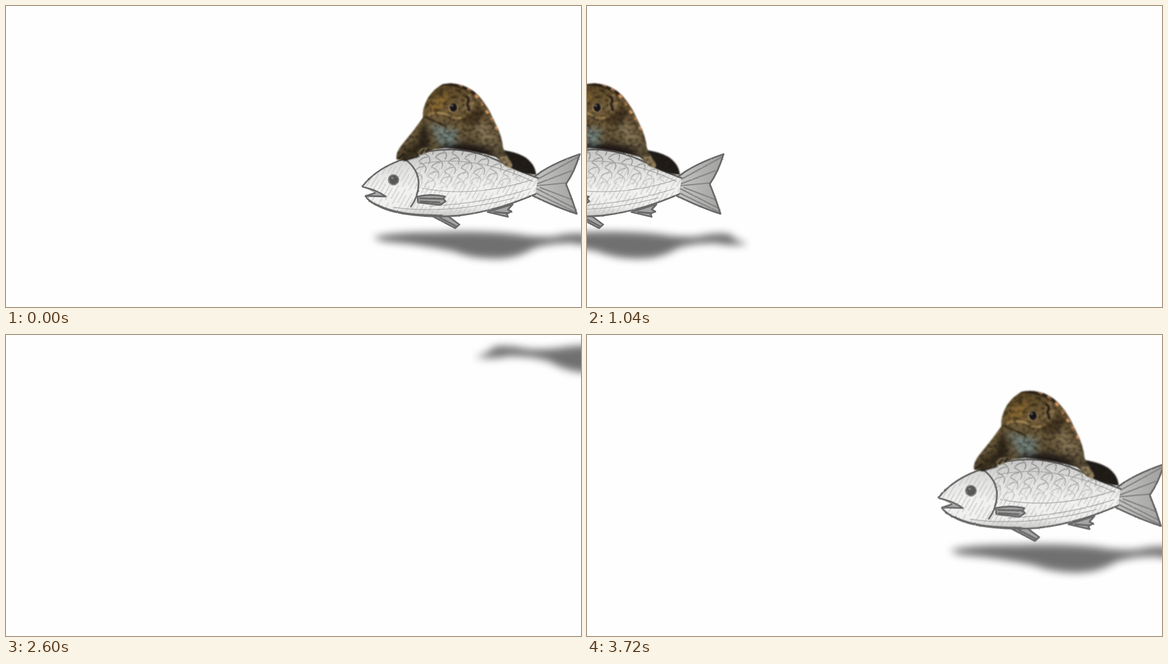
Write an HTML page without scripts that moves like this. It is 960x504 px and loops after 3.76 s.

```html
<!DOCTYPE html>
<html lang="en">
<head>
<meta charset="utf-8">
<title>Fish ride</title>
<style>
html, body { margin: 0; width: 100%; height: 100%; overflow: hidden; background: #fefefe; }
svg { display: block; width: 100vw; height: 100vh; }

.rider { transform-origin: 0 0; animation: swim 3760ms infinite; }

/* One tick is 40 ms, 94 ticks per loop */
@keyframes swim {
  0%       { transform: translate(0, 0) scale(1); animation-timing-function: steps(7, end); }
  7.4468%  { transform: translate(-170px, -16px) scale(1); animation-timing-function: steps(7, end); }
  14.8936% { transform: translate(-363px, 0) scale(1); animation-timing-function: steps(4, end); }
  19.1489% { transform: translate(-567px, 0) scale(1); animation-timing-function: steps(1, end); }
  21.2765% { transform: translate(-594px, 0) scale(1); animation-timing-function: steps(6, end); }
  27.6595% { transform: translate(-730px, 0) scale(1); animation-timing-function: steps(8, end); }
  36.1701% { transform: translate(-1008px, 0) scale(1); animation-timing-function: steps(1, end); }
  36.1702% { transform: translate(630px, -384px) scale(-1.056, 1.056); animation-timing-function: steps(8, end); }
  44.6808% { transform: translate(946px, -384px) scale(-1.056, 1.056); animation-timing-function: steps(14, end); }
  59.5744% { transform: translate(1507px, -384px) scale(-1.056, 1.056); animation-timing-function: steps(9, end); }
  69.1489% { transform: translate(1838px, -384px) scale(-1.056, 1.056); animation-timing-function: steps(4, end); }
  73.4042% { transform: translate(2022px, -384px) scale(-1.056, 1.056); animation-timing-function: steps(1, end); }
  76.5957% { transform: translate(334px, -41px) scale(1.037); animation-timing-function: steps(8, end); }
  85.1063% { transform: translate(184px, -41px) scale(1.037); animation-timing-function: steps(5, end); }
  90.4255% { transform: translate(122px, -41px) scale(1.037); animation-timing-function: steps(8, end); }
  98.9361%, 100% { transform: translate(-30px, -41px) scale(1.037); animation-timing-function: steps(1, end); }
}

.pencil { fill: none; stroke: #686868; stroke-width: 2.8; stroke-linecap: round; stroke-linejoin: round; }
.light  { fill: none; stroke: #a2a2a2; stroke-width: 1.2; }
.fin    { fill: #a4a4a4; }
</style>
</head>
<body>
<svg viewBox="0 0 960 504" preserveAspectRatio="none">
  <defs>
    <filter id="soft" x="-10%" y="-60%" width="120%" height="220%"><feGaussianBlur stdDeviation="6.5"/></filter>
    <filter id="blend" x="-50%" y="-50%" width="200%" height="200%"><feGaussianBlur stdDeviation="5"/></filter>
    <filter id="rough" x="-5%" y="-5%" width="110%" height="110%">
      <feTurbulence type="fractalNoise" baseFrequency=".25" numOctaves="2" seed="4"/>
      <feDisplacementMap in="SourceGraphic" scale="2" xChannelSelector="R" yChannelSelector="G"/>
      <feGaussianBlur stdDeviation=".7"/>
    </filter>
    <filter id="fur" x="-5%" y="-5%" width="110%" height="110%" color-interpolation-filters="sRGB">
      <feTurbulence type="fractalNoise" baseFrequency=".13 .18" numOctaves="3" seed="9"/>
      <feColorMatrix values="0 0 0 0 .1  0 0 0 0 .08  0 0 0 0 .05  1.6 0 0 0 -.65"/>
      <feComposite in2="SourceGraphic" operator="in" result="hair"/>
      <feMerge><feMergeNode in="SourceGraphic"/><feMergeNode in="hair"/></feMerge>
      <feGaussianBlur stdDeviation=".9"/>
    </filter>

    <linearGradient id="coat" x1="0" y1="0" x2=".2" y2="1">
      <stop offset="0" stop-color="#57421f"/>
      <stop offset=".4" stop-color="#75603c"/>
      <stop offset="1" stop-color="#5b503b"/>
    </linearGradient>
    <linearGradient id="scaleFade" x1="0" y1="0" x2="0" y2="1">
      <stop offset="0" stop-color="#fff"/>
      <stop offset=".35" stop-color="#999"/>
      <stop offset=".6" stop-color="#111"/>
    </linearGradient>
    <linearGradient id="skin" x1="0" y1="0" x2="0" y2="1">
      <stop offset="0" stop-color="#c6c6c5"/>
      <stop offset=".35" stop-color="#e4e4e2"/>
      <stop offset=".6" stop-color="#f2f2f0"/>
      <stop offset=".85" stop-color="#f0f0ee"/>
      <stop offset="1" stop-color="#c8c8c6"/>
    </linearGradient>
    <linearGradient id="tailTone">
      <stop offset="0" stop-color="#c6c6c5"/>
      <stop offset="1" stop-color="#a0a09f"/>
    </linearGradient>

    <pattern id="scales" width="23" height="17" patternUnits="userSpaceOnUse" patternTransform="rotate(22)">
      <path class="pencil" style="stroke-width:1.7;stroke:#858585" d="M1 1Q19 1 17 14M11 5Q3 9 1 16"/>
    </pattern>
    <pattern id="hatch" width="13" height="34" patternUnits="userSpaceOnUse" patternTransform="rotate(30)">
      <path class="light" style="stroke:#c4c4c4" d="M3 0V26M9 9V33"/>
    </pattern>
    <mask id="fade"><rect x="676" y="236" width="215" height="120" fill="url(#scaleFade)"/></mask>

    <path id="body" d="M595 302C612 280 636 265 668 255C698 240 748 236 784 246C820 254 850 275 888 288L884 315C846 331 806 345 755 351C710 355 650 350 622 335Q606 328 600 318L634 319Q616 308 595 302Z"/>
    <path id="tail" d="M882 286Q908 265 958 248Q949 278 935 298Q945 322 953 348Q921 338 878 317Z"/>
    <path id="torso" d="M652 257Q650 245 662 231Q680 210 696 187Q694 172 705 153Q715 138 729 131Q742 128 754 131Q773 134 789 150Q805 168 815 192Q828 216 830 238L845 263Q846 273 834 268L818 253Q776 241 734 238Q704 241 688 250L664 259Z"/>
    <clipPath id="inBody"><use href="#body"/></clipPath>
    <clipPath id="inTail"><use href="#tail"/></clipPath>
    <clipPath id="inTorso"><use href="#torso"/></clipPath>
    <clipPath id="inShadow"><rect x="590" y="350" width="414" height="95"/></clipPath>
  </defs>

  <g class="rider">
    <g clip-path="url(#inShadow)">
      <path filter="url(#soft)" fill="#000" fill-opacity=".56" d="M614 387Q650 378 720 379Q790 376 850 382Q885 388 915 386Q945 379 968 382Q980 395 1000 398Q975 403 945 397Q905 397 880 406Q852 424 812 423Q775 422 748 411Q690 399 640 395Q620 393 614 387Z"/>
    </g>

    <!-- Fish -->
    <g filter="url(#rough)">
      <g class="pencil">
        <path class="fin" d="M712 352L750 372L757 366L737 351Z"/>
        <path d="M724 354L752 369"/>
        <path class="fin" d="M804 345L838 353L836 348L844 344L838 341L846 332Z"/>
        <path d="M815 345L838 347"/>
      </g>
      <use href="#tail" fill="url(#tailTone)"/>
      <g clip-path="url(#inTail)" class="pencil" style="stroke:#858585;stroke-width:2.2">
        <path d="M884 292L955 253M886 298L944 276M885 301L938 296M886 306L948 338M892 304L944 324M882 312L950 345"/>
      </g>
      <path class="pencil" d="M882 286Q908 265 958 248Q949 278 935 298Q945 322 953 348Q921 338 878 317"/>
      <use href="#body" fill="url(#skin)"/>
      <g clip-path="url(#inBody)">
        <rect x="590" y="236" width="300" height="120" fill="url(#hatch)"/>
        <g mask="url(#fade)"><rect x="684" y="236" width="175" height="118" fill="url(#scales)"/></g>
        <path class="light" d="M694 305Q780 322 878 291M706 335Q800 331 878 305M646 337Q740 350 850 321M690 265Q780 246 880 294"/>
      </g>
      <path class="pencil" d="M884 315C846 331 806 345 755 351C710 355 650 350 622 335Q606 328 600 318M595 302C612 280 636 265 668 255C698 240 748 236 784 246C820 254 850 275 888 288"/>
      <g class="pencil">
        <path d="M667 257Q689 274 689 298Q688 320 676 336"/>
        <path d="M596 303Q619 308 634 319L601 318L616 313" fill="#aaa"/>
        <path d="M606 326C645 349 680 350 730 351"/>
        <path class="fin" d="M687 319Q710 314 733 319L730 323L734 327L725 333L688 329Z"/>
        <path d="M691 322L730 323M692 327L724 329"/>
      </g>
      <circle cx="647" cy="291" r="8.5" fill="#585858" stroke="#858585" stroke-width="2"/>
      <circle cx="645" cy="288" r="2.2" fill="#808080"/>
    </g>

    <!-- Squirrel -->
    <g filter="url(#fur)">
      <path fill="#211d19" d="M822 240Q852 244 868 254Q884 266 885 283Q861 281 842 270Z"/>
      <use href="#torso" fill="url(#coat)"/>
      <g clip-path="url(#inTorso)">
        <g filter="url(#blend)">
          <path fill="#76857f" d="M708 194Q736 206 756 208L748 232L722 230Z"/>
          <path fill="#1d1913" d="M728 232Q775 226 806 240L818 254L716 248Z"/>
          <path fill="#2b2217" d="M702 190L708 236L686 254L690 214Z"/>
          <path fill="#2f2818" d="M650 258L662 258L694 244L690 226Z"/>
          <path fill="#8a6930" d="M706 166Q720 146 742 150L730 172L706 182Z"/>
          <path fill="#857454" d="M776 190Q808 192 822 232L796 228Z"/>
          <path fill="#43321d" d="M752 186Q782 186 790 160L800 182L782 202Z"/>
        </g>
        <path fill="none" stroke="#b3955c" stroke-width="4" opacity=".7" d="M706 183Q724 174 740 184Q754 191 766 184"/>
        <path fill="none" stroke="#3d2d19" stroke-width="2.5" d="M700 186Q717 193 735 202"/>
        <path fill="none" stroke="#30241a" stroke-width="6" d="M728 130Q764 130 789 151"/>
        <path fill="none" stroke="#d79a68" stroke-width="5" stroke-dasharray="7 9" d="M756 131Q785 143 799 170L825 214"/>
      </g>
      <ellipse cx="773" cy="163" rx="8" ry="15" fill="#8c724d" transform="rotate(8 773 163)"/>
      <path fill="none" stroke="#30241a" stroke-width="4" d="M767 151Q776 154 770 164L774 176"/>
      <path fill="#7f6e50" d="M687 247Q688 237 704 237L722 238L708 243L692 250Z"/>
      <path fill="#94805d" d="M824 253L836 252L846 267L842 272L832 266Z"/>
      <path fill="none" stroke="#201b16" stroke-width="2.5" d="M692 248L698 240M701 245L707 238M654 256L665 247M664 259L690 251"/>
      <ellipse cx="747" cy="170" rx="8.5" ry="9" fill="#a58a58"/>
      <ellipse cx="747" cy="170" rx="6" ry="7" fill="#17131a"/>
      <circle cx="745" cy="167" r="1.5" fill="#a9a6b0"/>
    </g>
  </g>
</svg>
</body>
</html>
```
